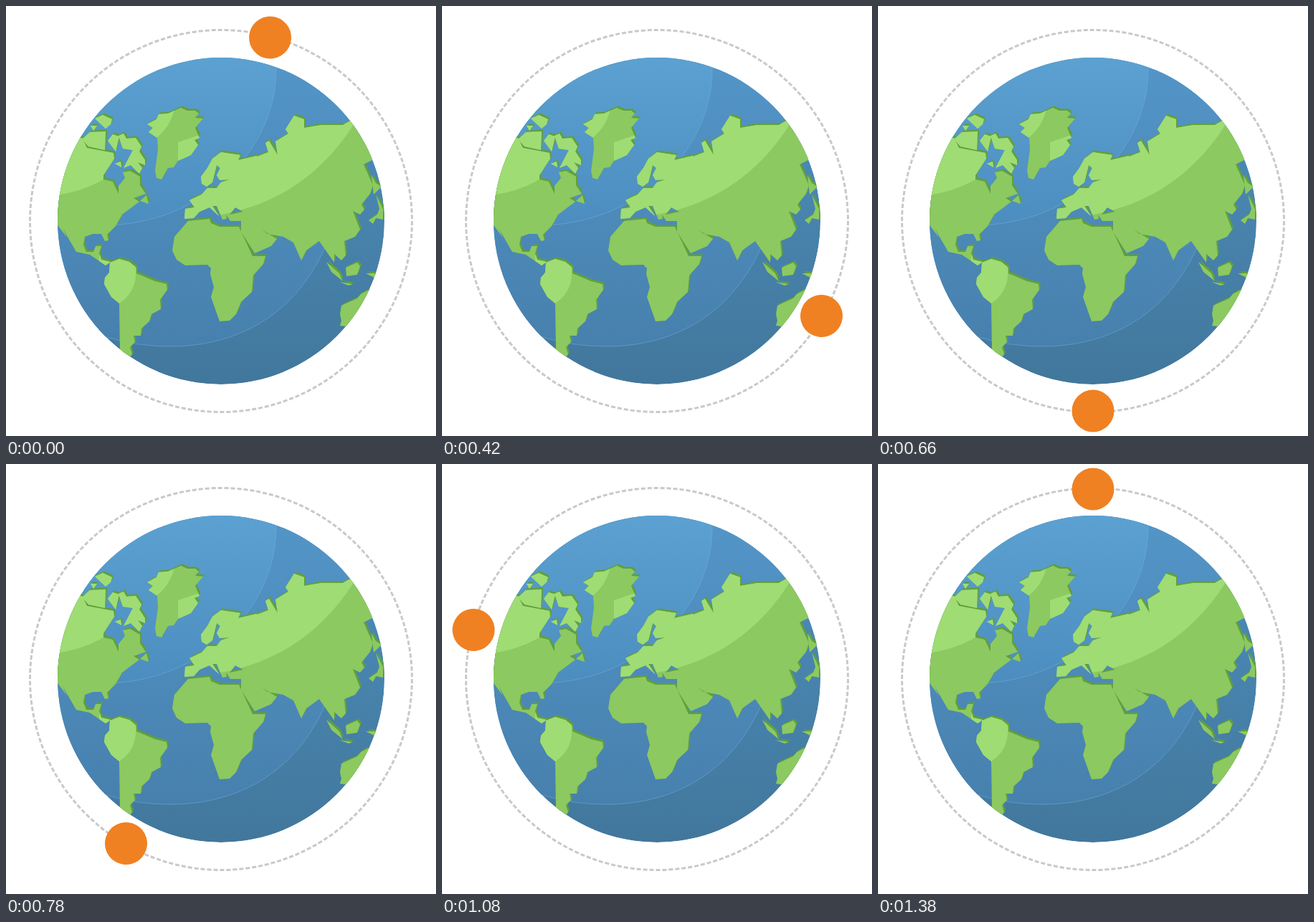
These frames come from a looping animation (600 px wide and 600 px high, 1440 ms). An HTML page:

```html
<!DOCTYPE html>
<html lang="en">
<head>
<meta charset="utf-8">
<title>Globe loader</title>
<style>
  html, body { margin: 0; width: 100%; height: 100%; overflow: hidden; background: #fff; }
  svg { display: block; width: 100vw; height: 100vh; }
</style>
</head>
<body>
<svg viewBox="0 0 600 600">
  <defs>
    <linearGradient id="deep" x2="0" y2="1">
      <stop stop-color="#4d8fbd"/><stop offset="1" stop-color="#42779c"/>
    </linearGradient>
    <linearGradient id="mid" x2="0" y2="1">
      <stop stop-color="#5496c9"/><stop offset="1" stop-color="#4780ad"/>
    </linearGradient>
    <linearGradient id="shine" x2="0" y2="1">
      <stop stop-color="#5ca2d2"/><stop offset="1" stop-color="#4c8dbf"/>
    </linearGradient>
    <clipPath id="disc"><circle cx="300" cy="300" r="228"/></clipPath>

    <g id="land" fill-rule="evenodd">
      <path id="europe" d="M249 297L250 283 263 281 256 271 273 263 281 254 294 254 300 246 312 242 298 243 294 236 299 226 294 222 288 246 280 252 273 248 272 238 281 226 288 213 300 204 327 208 324 215 350 209V300H313L307 291 308 297 302 298 294 279 288 279 298 294 284 281 270 287 262 296ZM312 291L320 281 331 287Z"/>
      <path id="asia" d="M340 214L366 204 362 191 367 188 379 208 376 189 394 178 390 172 402 153 416 158V170L440 166 470 166 484 158 530 180 511 215 499 221 512 250 508 262 496 277 500 284 494 291 484 286 494 312 487 322 472 328 474 348 468 355 458 346V358L437 328 419 341 412 355 401 330 387 322 365 318 357 312 378 325 370 335 347 345 328 315V298H340Z"/>
      <path id="africa" d="M254 300L284 297 286 303 298 308 325 308 344 349 362 349 359 360 345 376 343 399 328 413 321 430 312 439 298 440 286 406 290 392 285 374 286 366 281 361 250 362 238 354 232 341 235 322Z"/>
      <path id="northAmerica" d="M60 190L106 184 113 198 150 205 151 213 136 236V242L149 245 157 262V251L166 240 163 232 173 230 187 238V250L195 262 178 268 186 273 162 291 153 307 141 319 143 327 138 328 133 318 121 318 110 322 108 333 112 343 122 343 125 335 133 335 130 345 133 354 146 357 139 362 117 347 98 343 79 310 85 323 60 290Z"/>
      <path id="newfoundland" d="M187 272L196 264 199 276Z"/>
      <path id="arctic" d="M124 157L135 152 148 158 146 165 139 171ZM106 186L117 176 139 175 138 201 115 196ZM142 188L149 179 158 182 153 203ZM118 167H127L122 174ZM152 220L160 217 161 225Z"/>
      <path id="baffin" d="M157 181L164 178 168 185 181 184 189 196 186 203 194 215V222L184 218 190 226 186 234 174 222 164 226 177 201 163 199Z"/>
      <path id="greenland" d="M197 165L210 158 213 151 226 150 244 142 253 146 264 146 269 150 264 156 275 157 264 170 270 184 263 187 268 194 258 208 240 216 234 225 226 226 217 242 210 240 208 230 212 200 211 184 199 176 205 170Z"/>
      <path id="southAmerica" d="M145 358L158 353 172 357 182 365V373L208 384 224 388 225 396 215 410 216 423 203 430 200 440 189 450 188 460H178L180 469 173 476 176 486 168 496 159 482 158 415 147 406 137 388 138 379 144 372Z"/>
      <path id="australia" d="M520 389L495 402 490 408 468 418 466 430 468 439 466 446 495 450 530 420Z"/>
      <path id="indonesia" d="M447 357L465 373 470 384 454 371ZM465 385L484 388 478 390ZM474 365L490 358 494 363 490 375 475 377ZM502 373L518 373V381Z"/>
      <path id="japan" d="M510 236L516 247 524 252 513 263ZM516 263L526 283V298L516 296 512 304 506 299 518 291 521 283Z"/>
    </g>
    <mask id="landMask"><use href="#land" fill="#fff"/></mask>
  </defs>

  <circle cx="300" cy="300" r="266.5" fill="none" stroke="#c9c9c9" stroke-width="3" stroke-dasharray="6 3"/>

  <g clip-path="url(#disc)">
    <circle cx="300" cy="300" r="228" fill="url(#deep)"/>
    <g stroke="#74b3dc" stroke-opacity=".6" stroke-width=".8">
      <path fill="url(#mid)" d="M60 425Q140 475 228 475C330 475 406 425 445 337L500 160V60H60Z"/>
      <path fill="url(#shine)" d="M377 60V88C377 205 270 306 135 306L60 300V60Z"/>
    </g>
    <use href="#land" fill="#609f3c" x="2" y="-2.5"/>
    <use href="#land" fill="#8cc960"/>
    <g fill="#9fdc74" mask="url(#landMask)">
      <path d="M495 148C455 222 390 275 300 291L285 295 240 299V190L390 140Z"/>
      <path d="M60 265Q114 260 149 233L160 226 196 236V140H60Z"/>
      <path d="M236 140Q230 170 207 186H190V140Z"/>
      <path d="M177 348Q191 393 158 415H130V348Z"/>
    </g>
  </g>

  <circle id="badge" cx="300" cy="35" r="29.5" fill="#f08122"/>
</svg>
<script>
  const LOOP = 1440, STEP = 60, TURN = 15;
  const badge = document.getElementById('badge');

  function draw() {
    const step = Math.floor(performance.now() % LOOP / STEP) + 1;
    badge.setAttribute('transform', `rotate(${step * TURN} 300 300)`);
    requestAnimationFrame(draw);
  }
  draw();
</script>
</body>
</html>
```
